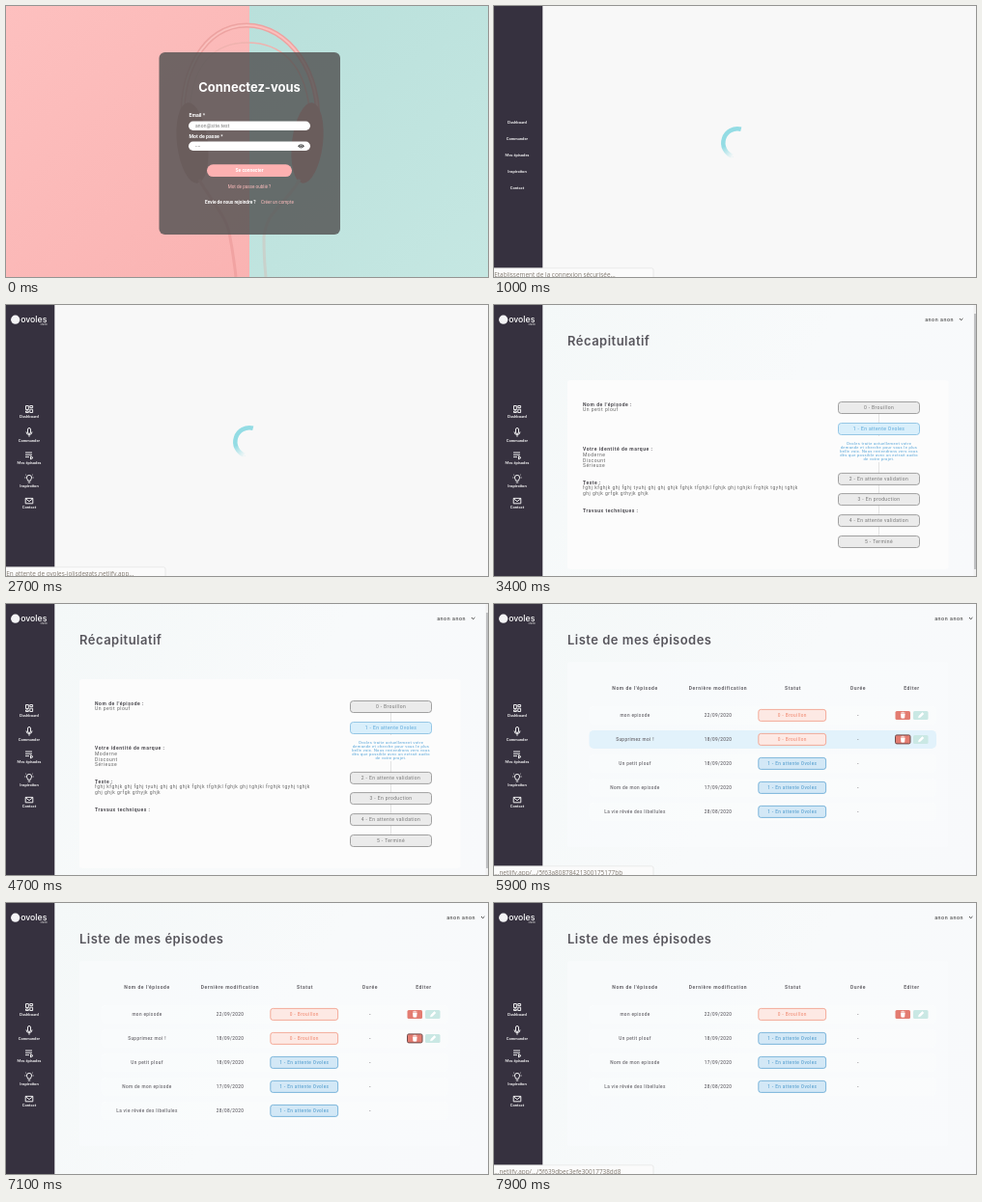
An HTML page with a canvas that plays this animation: 499x281 px, repeating every 8000 ms.

```html
<!DOCTYPE html>
<html lang="fr">
<head>
<meta charset="utf-8">
<title>Épisodes</title>
<style>
html, body { margin: 0; width: 100%; height: 100%; overflow: hidden; background: #f8f8f8; }
canvas { display: block; width: 499px; height: 281px; }
</style>
</head>
<body>
<canvas id="stage"></canvas>
<script>
const W = 499, H = 281, LOOP = 8000;
const canvas = document.getElementById('stage');
const dpr = window.devicePixelRatio || 1;
canvas.width = W * dpr;
canvas.height = H * dpr;
const c = canvas.getContext('2d');

const ROBOTO = 'Roboto, sans-serif', INTER = 'Inter, sans-serif';
const LATO = 'Lato, sans-serif', OPEN = '"Open Sans", sans-serif';
const RED = '#f29883', BLUE = '#62a6d3';
const SITE = 'ovoles-jolisdegats.netlify.app';

// Time helpers
const ramp = (t, from, to) => Math.min(1, Math.max(0, (t - from) / (to - from)));
const window_ = (t, from, to, fade) => Math.min(ramp(t, from, from + fade), 1 - ramp(t, to - fade, to));

// Drawing helpers; y is the middle of the lower-case letters
function text(s, x, y, size, color, { font = ROBOTO, weight = 400, align = 'left', gap = 0 } = {}) {
  c.font = `${weight} ${size}px ${font}`;
  c.letterSpacing = gap + 'px';
  c.textAlign = align;
  c.fillStyle = color;
  c.fillText(s, x, y + size * 0.34);
}

function box(x, y, w, h, r, fill, stroke, line = 0.8) {
  c.beginPath();
  c.roundRect(x, y, w, h, r);
  if (fill) { c.fillStyle = fill; c.fill(); }
  if (stroke) { c.strokeStyle = stroke; c.lineWidth = line; c.stroke(); }
}

function path(d, stroke, line = 1, fill) {
  const p = new Path2D(d);
  if (fill) { c.fillStyle = fill; c.fill(p); }
  if (stroke) { c.strokeStyle = stroke; c.lineWidth = line; c.stroke(p); }
}

function at(x, y, draw) {
  c.save();
  c.translate(x, y);
  draw();
  c.restore();
}

function faded(alpha, draw) {
  if (alpha <= 0) return;
  c.save();
  c.globalAlpha *= alpha;
  draw();
  c.restore();
}

// Login page
function headphones() {
  const band = 'M184 128C178 70 205 20 249 20S328 70 322 128';
  path(band, '#eda3a1', 5);
  path(band, '#fbc0be', 2);
  path('M190 106C194 62 214 38 250 38S309 62 314 106', '#efb3af', 1.5);
  for (const [x, tilt] of [[193, -0.12], [312, 0.12]]) {
    c.beginPath();
    c.ellipse(x, 142, 16, 42, tilt, 0, 7);
    c.fillStyle = '#d98f8d';
    c.fill();
  }
  path('M200 180C214 205 230 220 232 240Q236 262 238 281', '#f1a3a2', 3);
  path('M304 180C290 205 268 215 267 240Q267 262 269 281', '#c9d2cc', 3);
}

function login(t) {
  const pink = c.createLinearGradient(0, 0, 252, H);
  pink.addColorStop(0, '#fdc0bf');
  pink.addColorStop(1, '#fab3b2');
  c.fillStyle = pink;
  c.fillRect(0, 0, 252, H);
  const mint = c.createLinearGradient(252, 0, W, H);
  mint.addColorStop(0, '#b9e0db');
  mint.addColorStop(1, '#c5e7e2');
  c.fillStyle = mint;
  c.fillRect(252, 0, W - 252, H);
  headphones();

  box(158.5, 48, 187.5, 189, 6, 'rgba(82,82,82,.82)');
  text('Connectez-vous', 252, 85, 13, '#fff', { font: INTER, weight: 700, align: 'center' });
  text('Email *', 189.5, 113.3, 5.2, '#fff', { weight: 700 });
  box(189, 119.5, 126, 9.5, 4.7, '#fff');
  text('anon@site.test', 196, 124.3, 5, '#777', { gap: 0.15 });
  text('Mot de passe *', 189.5, 134.8, 5.2, '#fff', { weight: 700 });
  box(189, 140.5, 126, 9.5, 4.7, '#fff');
  text('••••', 196, 145.3, 4, '#888');
  path('M302 145.3Q305.5 141 309 145.3Q305.5 149.6 302 145.3Z', null, 0, '#444');
  c.beginPath();
  c.arc(305.5, 145.3, 1.2, 0, 7);
  c.strokeStyle = '#fff';
  c.lineWidth = 0.6;
  c.stroke();
  box(208, 164.3, 88, 12.7, 6.3, t < 700 ? '#fdb1b1' : '#fba9a9');
  text('Se connecter', 252, 170.8, 4.9, '#fff', { weight: 700, align: 'center' });
  text('Mot de passe oublié ?', 252, 187.6, 4.6, '#fdbdbd', { align: 'center' });
  text('Envie de nous rejoindre ?', 206, 203.2, 4.7, '#fff', { weight: 700 });
  text('Créer un compte', 264, 203.2, 4.6, '#fdbdbd');
}

// Shared page frame
const ICONS = [
  'M-3.5-3.5h2.8v4h-2.8zM.8-3.5h2.8v2h-2.8zM-3.5 2h2.8v1.5h-2.8zM.8.2h2.8v3.3h-2.8z',
  'M-1.5-3a1.5 1.5 0 0 1 3 0v3a1.5 1.5 0 0 1-3 0zM-3-.5a3 3 0 0 0 6 0M0 2.5v2.2',
  'M-4-3h7M-4-.7h7M-4 1.6h4M1.5.8l2.5 1.6l-2.5 1.6z',
  'M-1.4 2.2C-1.4.8-2.6.5-2.6-1a2.6 2.6 0 0 1 5.2 0C2.6.5 1.4.8 1.4 2.2zM-1.2 4h2.4M-4.6-1h1M3.6-1h1M-3.6-4l.7.6M3.6-4l-.7.6',
  'M-3.8-2.6h7.6v5.4h-7.6zM-3.8-2.4L0 .7L3.8-2.4'
];
const MENU = ['Dashboard', 'Commander', 'Mes épisodes', 'Inspiration', 'Contact'];
const ICON_Y = [108, 132, 156, 180, 203];
const LABEL_Y = [115.7, 140.6, 163.5, 188, 209.7];

function sidebar(ready) {
  c.fillStyle = '#36313f';
  c.fillRect(0, 0, 50.3, H);
  if (ready) {
    c.beginPath();
    c.arc(9.7, 15.2, 4.6, 0, 7);
    c.fillStyle = '#f4f4f6';
    c.fill();
    text('ovoles', 15.2, 15, 8.7, '#fff', { font: INTER, weight: 500 });
    text('studio', 42.8, 20, 2.6, '#ddd', { align: 'right' });
  }
  MENU.forEach((label, i) => {
    const y = ready ? LABEL_Y[i] : 120.6 + i * 17;
    text(label, 24, y, 4.1, '#fff', { font: LATO, weight: 700, align: 'center' });
    if (ready) at(24, ICON_Y[i], () => path(ICONS[i], '#fff', 0.9));
  });
}

function page(title, right) {
  const wash = c.createLinearGradient(50, 0, W, H);
  wash.addColorStop(0, '#f4f8f8');
  wash.addColorStop(0.5, '#f8fafb');
  wash.addColorStop(1, '#f8f9fb');
  c.fillStyle = wash;
  c.fillRect(50, 0, W - 50, H);
  text('anon anon', right - 10, 14.8, 5.3, '#555', { weight: 500, align: 'right', gap: 0.55 });
  path(`M${right - 4} 14l1.7 1.7l1.7-1.7`, '#444', 1);
  text(title, 76, 38, 13, '#57555c', { font: INTER, weight: 600, gap: 0.48 });
}

function loader(t, start) {
  c.fillStyle = '#f8f8f8';
  c.fillRect(50, 0, W - 50, H);
  at(252, 142, () => {
    c.rotate((t - start) / 1000 * Math.PI * 2);
    const fade = c.createConicGradient(Math.PI * 0.6, 0, 0);
    fade.addColorStop(0, 'rgba(147,220,228,0)');
    fade.addColorStop(0.16, 'rgba(147,220,228,1)');
    fade.addColorStop(1, 'rgba(147,220,228,1)');
    c.beginPath();
    c.arc(0, 0, 14.7, Math.PI * 0.6, Math.PI * 1.58);
    c.strokeStyle = fade;
    c.lineWidth = 4.5;
    c.stroke();
  });
}

function statusBar(label) {
  if (!label) return;
  box(-2, 271.8, 167, 12, 2, '#fbfbfb', '#e2e2e2', 0.7);
  text(label, 0.3, 278.9, 6.4, '#827a70', { font: OPEN });
}

// Episode summary
function summary() {
  page('Récapitulatif', 486);
  box(76, 78, 394.5, 196, 3, '#fcfcfc');
  c.fillStyle = '#f1f1f1';
  c.fillRect(496.5, 0, 2.5, H);
  c.fillStyle = '#bfc0c2';
  c.fillRect(497, 9, 2, 265);

  const head = (s, y) => text(s, 92, y, 5, '#4c4a50', { weight: 700, gap: 0.55 });
  const body = (s, y) => text(s, 92, y, 5, '#666', { gap: 0.5 });
  head("Nom de l'épisode :", 103.2);
  body('Un petit plouf', 108.7);
  head('Votre identité de marque :', 149.6);
  ['Moderne', 'Discount', 'Sérieuse'].forEach((s, i) => body(s, 155.3 + i * 5.5));
  head('Texte :', 184);
  body('fghj kfghjk ghj fghj tyuhj ghj ghj ghjk fghjk tfghjkl fghjk ghj tghjki frghjk tgyhj tghjk', 189.7);
  body('ghj ghjk grfgk gthyjk ghjk', 195.2);
  head('Travaux techniques :', 213);

  c.fillStyle = '#dcdcdc';
  c.fillRect(398, 112, 0.8, 24);
  c.fillRect(398, 163, 0.8, 78);
  const steps = ['Brouillon', 'En attente Ovoles', 'En attente validation', 'En production', 'En attente validation', 'Terminé'];
  [106.5, 128.5, 180.4, 201.6, 223.6, 245.5].forEach((y, i) => {
    const on = i === 1;
    box(356.5, y - 6, 84, 12, 3, on ? '#d9effb' : '#ebebeb', on ? '#7fbbe0' : '#8c8c8c');
    text(`${i} - ${steps[i]}`, 398.5, y, 5, on ? '#58a6d8' : '#777', { align: 'center', gap: 0.38 });
  });
  ['Ovoles traite actuellement votre', 'demande et cherche pour vous le plus', 'belle voix. Nous reviendrons vers vous',
   'dès que possible avec un extrait audio', 'de votre projet.'].forEach((s, i) =>
    text(s, 398.5, 143.4 + i * 4.1, 4, '#4c9fd6', { align: 'center', gap: 0.34 }));
}

// Episode list
const EPISODES = [
  { name: 'mon episode', date: '22/09/2020', draft: true },
  { name: 'Supprimez moi !', date: '18/09/2020', draft: true },
  { name: 'Un petit plouf', date: '18/09/2020' },
  { name: 'Nom de mon episode', date: '17/09/2020' },
  { name: 'La vie rêvée des libellules', date: '28/08/2020' }
];
const COLUMNS = [['Nom de l\'épisode', 146], ['Dernière modification', 232], ['Statut', 309.5], ['Durée', 377], ['Editer', 432.5]];

function editButtons(y, focused) {
  box(415.5, y - 4.5, 15.5, 9, 1.5, '#e37c71', focused ? '#6d4a4a' : null, 1);
  path(`M421.4 ${y - 1.4}h3.8l-.4 4.2h-3zM421 ${y - 2.5}h4.6M422.5 ${y - 3.1}h1.6`, '#fff', 0.7, '#fff');
  box(434, y - 4.5, 15.5, 9, 1.5, '#cae8e4');
  path(`M439.5 ${y + 2.5}l.5-1.9l3.5-3.5l1.4 1.4l-3.5 3.5z`, '#fff', 0.6, '#fff');
}

function list({ hover = -1, glow = 0, focus = false, removed = false }) {
  page('Liste de mes épisodes', 496);
  box(76, 60, 394, 192, 3, 'rgba(251,252,253,.6)');
  for (const [label, x] of COLUMNS)
    text(label, x, 87.6, 5, '#66646a', { weight: 700, align: 'center', gap: 0.56 });
  const rows = removed ? EPISODES.filter((_, i) => i !== 1) : EPISODES;
  rows.forEach((row, i) => {
    const y = 115.4 + i * 25;
    const cell = (s, x, color = '#6c6a70') => text(s, x, y, 4.7, color, { weight: 500, align: 'center', gap: 0.37 });
    box(98.5, y - 9.5, 359.5, 19, 5, 'rgba(252,253,253,.55)');
    if (i === hover) faded(glow, () => box(98.5, y - 9.5, 359.5, 19, 5, '#e2f2fb'));
    cell(row.name, 146);
    cell(row.date, 232);
    cell('-', 377);
    box(273.8, y - 6, 69.8, 12, 2.5, row.draft ? '#fde9e4' : '#d3e8f6', row.draft ? RED : BLUE);
    cell(row.draft ? '0 - Brouillon' : '1 - En attente Ovoles', 308.8, row.draft ? RED : BLUE);
    if (row.draft) editButtons(y, focus && i === 1 && !removed);
  });
}

function dialog(show) {
  faded(show, () => at(0, (show - 1) * 6, () => {
    c.save();
    c.shadowColor = 'rgba(0,0,0,.5)';
    c.shadowBlur = 5;
    c.shadowOffsetY = 1;
    box(84, -8, 308, 86, 2, '#fff');
    c.restore();
    text(SITE + ' indique', 122, 14.7, 8, '#3c3c3c', { font: OPEN });
    text('Souhaitez vous supprimer votre brouillon ?', 122, 32, 7, '#7c7c7c', { font: OPEN });
    box(282, 48, 47, 20, 2, '#8aa7c4', '#6b8fb5', 1.4);
    text('OK', 305.5, 58, 7, '#fff', { font: OPEN, weight: 700, align: 'center' });
    box(334.5, 48.5, 47, 19.5, 2, '#fff', '#dadce0');
    text('Annuler', 358, 58, 7, '#4a83c4', { font: OPEN, align: 'center' });
  }));
}

const link = id => '...netlify.app/.../' + id;
const DRAFT_A = link('5f639dbec3efe30017738dd8');
const DRAFT_B = link('5f63a80878421300175177bb');

function draw(t) {
  c.setTransform(dpr, 0, 0, dpr, 0, 0);
  c.clearRect(0, 0, W, H);
  if (t < 1000) return login(t);

  let status = '';
  if (t < 1500) {
    loader(t, 1000);
    if (t >= 1400) faded(ramp(t, 1400, 1500), () => list({}));
    if (t < 1400) status = 'Etablissement de la connexion sécurisée...';
  } else if (t < 2700) {
    list({ hover: 2, glow: t < 2000 ? 0 : 1 });
  } else if (t < 4800) {
    loader(t, 2700);
    faded(ramp(t, 2900, 3100), summary);
    if (t < 3000) status = `En attente de ${SITE}...`;
  } else {
    if (t < 5100) summary();
    const overDraft = t >= 5700 && t < 7100;
    faded(ramp(t, 4750, 5000), () => list({
      hover: overDraft ? 1 : 0,
      glow: overDraft ? window_(t, 5700, 7100, 150) : window_(t, 5400, 5750, 100),
      focus: t >= 5900,
      removed: t >= 7300
    }));
    dialog(window_(t, 5999, 7100, 200));
    if (t < 5900) status = DRAFT_A;
    else if (t < 7000) status = DRAFT_B;
    else if (t >= 7500) status = DRAFT_A;
  }
  sidebar(t >= 1200);
  statusBar(status);
}

(function frame() {
  draw(performance.now() % LOOP);
  requestAnimationFrame(frame);
})();
</script>
</body>
</html>
```
